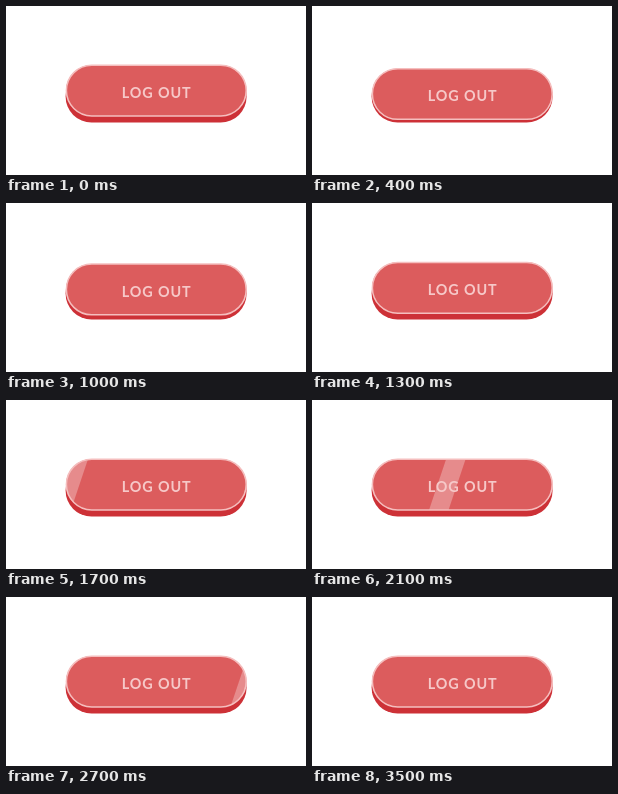
Recreate the animation shown at these times as an HTML page. Size 300 by 169 pixels, loop 3600 ms.

```html
<!DOCTYPE html>
<html lang="en">
<head>
<meta charset="utf-8">
<title>Log out button</title>
<style>
  html, body { margin: 0; width: 100%; height: 100%; overflow: hidden; background: #fff; }
  svg { display: block; width: 100%; height: 100%; }
  text { font: 700 14.4px Lato, sans-serif; letter-spacing: .9px; fill: #f6c8c8; }
</style>
</head>
<body>
<svg viewBox="0 0 300 169">
  <defs>
    <clipPath id="pill"><rect x="60" y="59" width="180.5" height="51" rx="25.5"/></clipPath>
  </defs>
  <rect x="59.6" y="64.6" width="181" height="52" rx="26" fill="#cd3137"/>
  <g id="face">
    <rect x="60" y="59" width="180.5" height="51" rx="25.5" fill="#dc5c5d"/>
    <g clip-path="url(#pill)">
      <path id="shine" d="M1.5 58H21L3.2 111H-16.3Z" fill="#fff" fill-opacity=".29"/>
    </g>
    <rect x="60.4" y="59.2" width="179.8" height="50.7" rx="25.35" fill="none" stroke="#f5bebe" stroke-width="1.5"/>
    <text x="150.7" y="91.8" text-anchor="middle">LOG OUT</text>
  </g>
</svg>
<script>
  const LOOP = 3600, STEP = 100, DEPTH = 3.8;
  const face = document.getElementById('face');
  const shine = document.getElementById('shine');

  const clamp = v => Math.min(1, Math.max(0, v));
  const progress = (t, from, to) => clamp((t - from) / (to - from));
  const ease = p => (1 - Math.cos(Math.PI * p)) / 2;

  function render(t) {
    const press = ease(progress(t, 0, 500)) - ease(progress(t, 500, 1500));
    face.setAttribute('transform', `translate(0 ${DEPTH * press})`);
    shine.setAttribute('transform', `translate(${133 + (t - 2100) * 0.179} 0)`);
  }

  const start = performance.now();
  function frame() {
    const t = (performance.now() - start) % LOOP;
    render(Math.floor(t / STEP) * STEP);
    requestAnimationFrame(frame);
  }
  frame();
</script>
</body>
</html>
```
